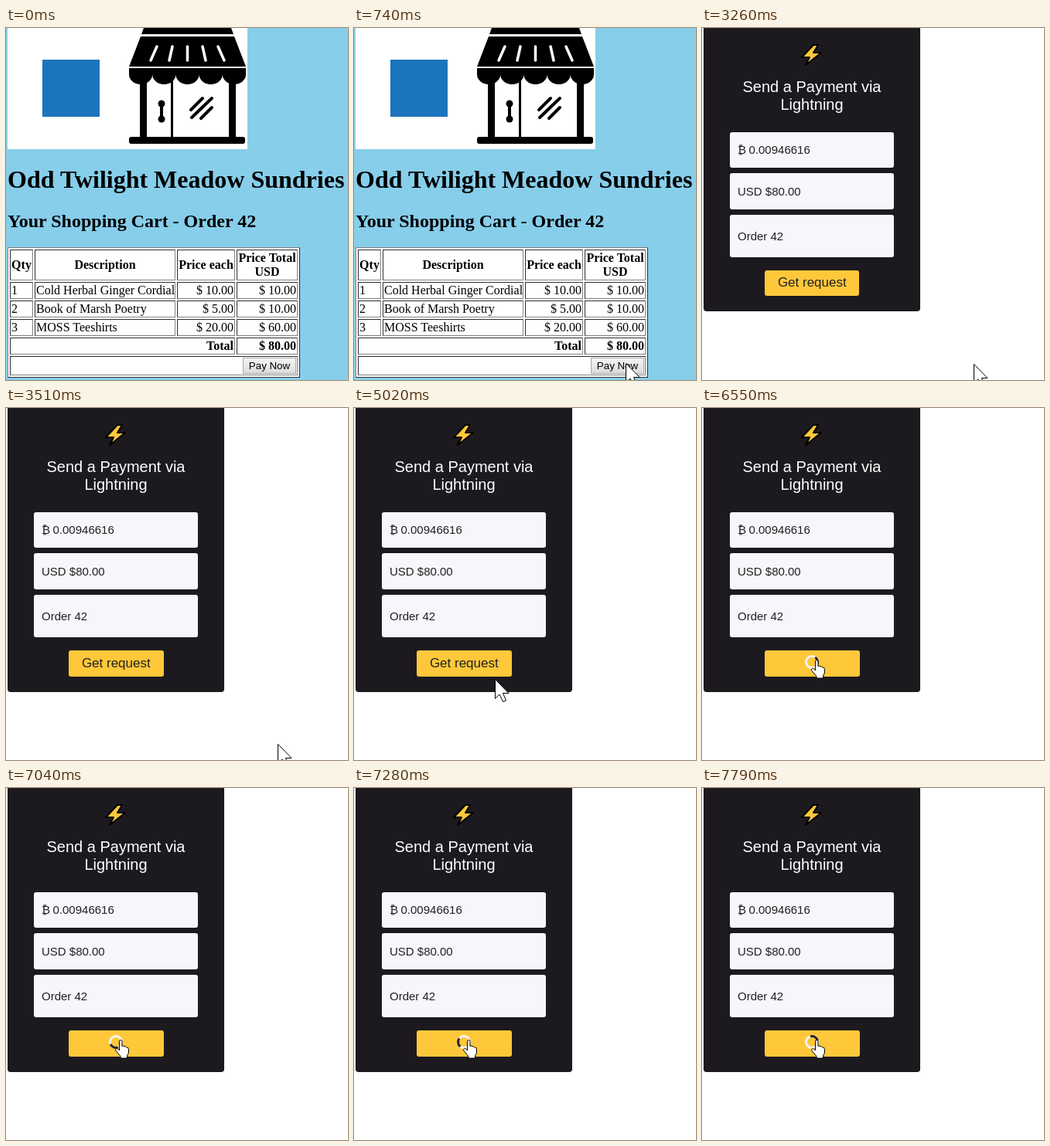
These frames come from a looping animation (442x456 px, 8000 ms). An HTML page:

```html
<!DOCTYPE html>
<html lang="en">
<head>
<meta charset="utf-8">
<title>Checkout</title>
<style>
  html, body { margin: 0; width: 100%; height: 100%; overflow: hidden; background: #fff; }
  svg { display: block; width: 442px; height: 456px; }
  .serif { font: bold 16px "Liberation Serif", serif; }
  .sans { font: 15px "Liberation Sans", sans-serif; }
  .mid { text-anchor: middle; }
  table { table-layout: fixed; width: 378px; background: #fff; color: #000;
    font: 16px/18px "Liberation Serif", serif; white-space: nowrap; }
  td:nth-child(n+3), .sum td { text-align: right; }
  .button { box-sizing: border-box; width: 69px; height: 21px; margin-left: auto;
    border: 1px solid #a5a9ad; background: linear-gradient(#f4f4f4, #dcdcdc);
    font: 13.333px/19px "Liberation Sans", sans-serif; text-align: center; }
</style>
</head>
<body>
<svg viewBox="0 0 442 456">
  <g id="shop" class="serif">
    <rect width="442" height="456" fill="#87ceeb"/>
    <rect x="2" width="310" height="157" fill="#fff"/>
    <rect x="47" y="41" width="74" height="74" fill="#1c75bc"/>
    <g id="store">
      <path d="M178 0H291L294 8H175Z"/>
      <path d="M174 11H295L310 50H159Z"/>
      <path id="scallops"/>
      <path d="M173 66H182V142H173ZM213 66H216V142H213ZM288 66H297V142H288Z"/>
      <rect x="159" y="141" width="150" height="9" rx="3"/>
      <path d="M195 24L187 42M215 24L211 42M234.500 24V42M254 24L258 42M274 24L282 42"
        fill="none" stroke="#fff" stroke-width="3.500" stroke-linecap="round"/>
      <path d="M239 106L254 91M240 116L266 91M252 117L266 103M201 98V118"
        fill="none" stroke="#000" stroke-width="4" stroke-linecap="round"/>
      <circle cx="201" cy="98" r="4.500"/>
      <circle cx="201" cy="118" r="4.500"/>
    </g>
    <text x="2" y="207" style="font-size:32px">Odd Twilight Meadow Sundries</text>
    <text x="2" y="258" style="font-size:24px">Your Shopping Cart - Order 42</text>
    <foreignObject x="2" y="284" width="380" height="172">
      <table border="1">
        <colgroup><col width="30"><col width="182"><col width="75"><col width="79"></colgroup>
        <tr><th>Qty</th><th>Description</th><th>Price each</th><th>Price Total<br>USD</th></tr>
        <tr><td>1</td><td>Cold Herbal Ginger Cordial</td><td>$ 10.00</td><td>$ 10.00</td></tr>
        <tr><td>2</td><td>Book of Marsh Poetry</td><td>$ 5.00</td><td>$ 10.00</td></tr>
        <tr><td>3</td><td>MOSS Teeshirts</td><td>$ 20.00</td><td>$ 60.00</td></tr>
        <tr class="sum"><td colspan="3"><b>Total</b></td><td><b>$ 80.00</b></td></tr>
        <tr><td colspan="4"><div class="button">Pay Now</div></td></tr>
      </table>
    </foreignObject>
  </g>

  <g id="pay" class="sans">
    <rect width="442" height="456" fill="#fff"/>
    <rect id="card" x="2" y="-8" width="280" rx="4" fill="#1d1a1f"/>
    <path d="M144 22L129 38H139L134 48L154 32H144L150 22Z" fill="#ffc83d" stroke="#000" stroke-width="2" stroke-linejoin="round"/>
    <g class="mid" fill="#fff" style="font-size:20px">
      <text x="142" y="83">Send a Payment via</text>
      <text x="142" y="106">Lightning</text>
    </g>
    <g fill="#f7f6fb">
      <rect x="36" y="135" width="212" height="46" rx="3"/>
      <rect x="36" y="188" width="212" height="47" rx="3"/>
      <rect x="36" y="242" width="212" height="55" rx="3"/>
    </g>
    <g fill="#212121">
      <text x="46" y="163">₿<tspan x="60.500">0.00946616</tspan></text>
      <text x="46" y="217">USD $80.00</text>
      <text x="46" y="275">Order 42</text>
    </g>
    <rect id="button" x="81" y="314" rx="3" fill="#ffc83a"/>
    <text id="label" class="mid" x="142.300" fill="#212121" style="font-size:17px">Get request</text>
    <g id="spinner" fill="none" stroke-width="3">
      <circle r="7.500" stroke="#f6f4f2"/>
      <path d="M-5.300 -5.300A7.500 7.500 0 0 1 5.300 -5.300" stroke="#2a2622"/>
    </g>
  </g>

  <path id="arrow" d="M.5 .5V25.500L6 20L10.500 29.500L14.500 28L10.500 18.500H18Z" fill="#fff" stroke="#000"/>
  <path id="hand" d="M5.500 14V2.500Q5.500 .5 7.300 .5T9 2.500V8.500Q10.500 7 12 9Q13.500 8 14.700 10Q17.500 9.500 17.500 12.500V17L15.500 21V24H7V21.500L1 14.500Q0 12.500 1.500 11.500T4 12.500Z" fill="#fff" stroke="#000" stroke-linejoin="round"/>
</svg>
<script>
const LOOP = 8000;
const PAY_AT = 3260, SETTLE_AT = 3510, CLICK_AT = 6290;
const $ = id => document.getElementById(id);

// [time, cursor shape, x, y]
const cursorSteps = [
  [0, "none", 0, 0],
  [740, "arrow", 351, 434],
  [3260, "arrow", 351, 435],
  [4510, "arrow", 320, 414],
  [4770, "arrow", 262, 393],
  [5020, "arrow", 182, 351],
  [5270, "hand", 150, 332],
  [5520, "hand", 141, 326]
];
const spinTimes = [6290, 6550, 6800, 7040, 7280, 7550, 7790];

function buildScallops() {
  let d = "M159 52";
  for (let i = 0; i < 5; i++) d += "v8a15.100 13 0 0 0 30.200 0v-8";
  $("scallops").setAttribute("d", d + "Z");
}

const show = (id, on) => $(id).setAttribute("display", on ? "inline" : "none");
const move = (id, x, y, turn = 0) =>
  $(id).setAttribute("transform", `translate(${x} ${y}) rotate(${turn})`);

function draw(t) {
  const paying = t >= PAY_AT;
  const grow = t >= SETTLE_AT ? 1 : 0;
  const busy = t >= CLICK_AT;
  show("shop", !paying);
  show("pay", paying);
  $("card").setAttribute("height", 375 + grow);
  $("button").setAttribute("width", 122 + grow);
  $("button").setAttribute("height", 33 + grow);
  $("label").setAttribute("y", 335 + grow);
  show("label", !busy);
  show("spinner", busy);
  if (busy) {
    const time = spinTimes.findLast(s => s <= t);
    move("spinner", 142, 329, 80 + (time - 6550) * .25);
  }
  const [, shape, x, y] = cursorSteps.findLast(step => step[0] <= t);
  for (const id of ["arrow", "hand"]) {
    show(id, id === shape);
    move(id, x, y);
  }
}

buildScallops();
const start = performance.now();
function tick() {
  draw((performance.now() - start) % LOOP);
  requestAnimationFrame(tick);
}
tick();
</script>
</body>
</html>
```
